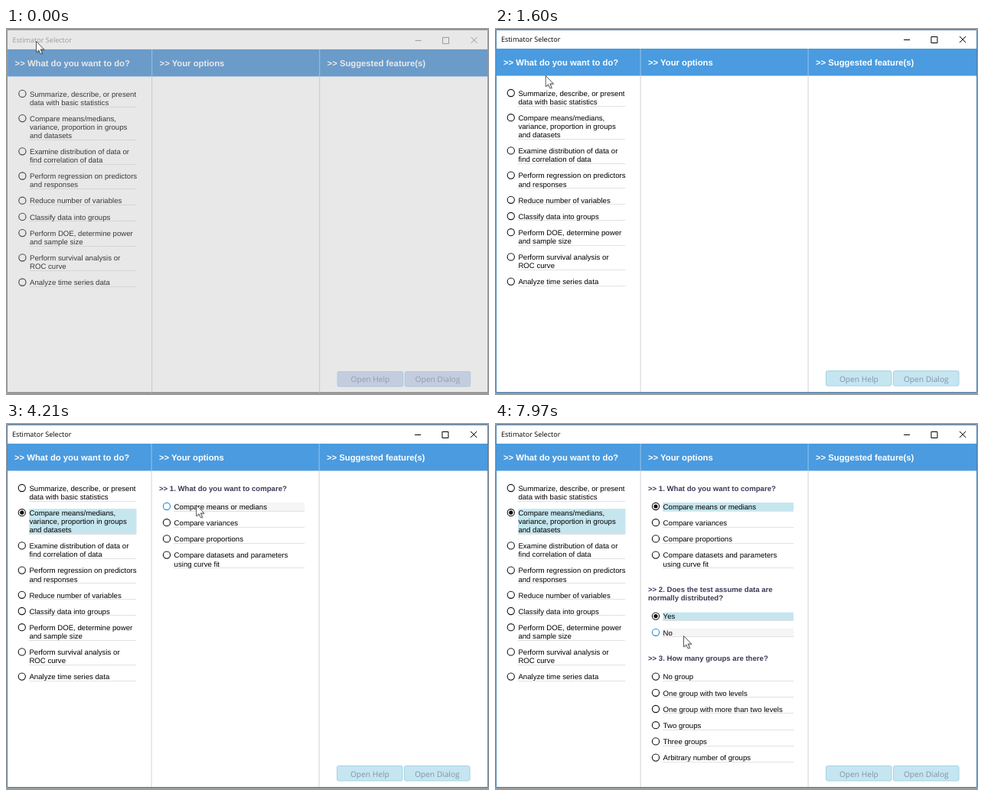
Write an HTML page that moves like this. It is 631x480 px and loops after 8 s.

```html
<!DOCTYPE html>
<html lang="en">
<head>
<meta charset="utf-8">
<title>Estimator Selector</title>
<style>
html, body { margin: 0; width: 100%; height: 100%; overflow: hidden; }
svg { display: block; width: 100%; height: 100%; }
text { font: 9.63px "Liberation Sans", Arial, sans-serif; white-space: pre; text-rendering: geometricPrecision; }
.head { font-size: 11.28px; font-weight: bold; fill: #fff; }
.ask { font-size: 9.6px; font-weight: bold; fill: #3b3b58; }
.title { font: 9.1px "Open Sans", "Noto Sans", sans-serif; }
.btn { font: 10.2px "Open Sans", "Noto Sans", sans-serif; fill: #8291a8; text-anchor: middle; }
</style>
</head>
<body>
<svg id="stage" viewBox="0 0 631 480"></svg>
<script>
const LOOP = 8000, STEP = 60, GAP = 11.2;
const stage = document.getElementById('stage');

function add(parent, tag, attrs, text) {
  const el = document.createElementNS('http://www.w3.org/2000/svg', tag);
  for (const k in attrs) el.setAttribute(k, attrs[k]);
  if (text) el.textContent = text;
  parent.appendChild(el);
  return el;
}
const box = (p, x, y, width, height, fill, more) => add(p, 'rect', { x, y, width, height, fill, ...more });
const line = (p, d, stroke, more) => add(p, 'path', { d, stroke, fill: 'none', ...more });
const show = (el, on) => el.setAttribute('visibility', on ? 'inherit' : 'hidden');

// Window frame
box(stage, 0, 0, 631, 480, '#9b9b9b');
box(stage, 1, 2, 629, 475, '#fff');
const edge = line(stage, 'M1.5 2.5H629.5V476.5H1.5Z', '#4a7fae');
const win = add(stage, 'g');

const titleBar = add(win, 'g');
add(titleBar, 'text', { class: 'title', x: 8, y: 18.4 }, 'Estimator Selector');
line(titleBar, 'M534 15.5H542M569.9 11.5H577.9V19.5H569.9ZM607 11L615 19M615 11L607 19', '#000');

// Column headers and dividers
const band = box(win, 1.5, 27, 627.5, 35.5, '#4a9bdf');
for (const x of [190.1, 409.1]) {
  line(win, `M${x} 27V62.5`, '#94c4ec');
  line(win, `M${x} 62.5V476`, '#d2d2d2');
}
[[11, 'What do you want to do?'], [200, 'Your options'], [419, 'Suggested feature(s)']]
  .forEach(([x, s]) => add(win, 'text', { class: 'head', x, y: 49 }, '>> ' + s));

// Buttons
const buttons = [[432.5, 'Open Help'], [520.5, 'Open Dialog']].map(([x, s]) => {
  const b = box(win, x, 448.5, 85.5, 19.5, '#c5e6f0', { rx: 2, stroke: '#a4d2e4' });
  add(win, 'text', { class: 'btn', x: x + 42.8, y: 462.6 }, s);
  return b;
});

// Radio options
const rows = [];
function addRow(parent, x, width, c, label, shownAt, pickedAt) {
  const lines = label.split('|');
  const bottom = Math.round(c + 5.5 + GAP * (lines.length - 1));
  const right = x + width;
  const back = box(parent, x, c - 5, width, bottom - c + 5, 'none');
  line(parent, `M${x} ${bottom + .5}H${right}`, '#c4c4c4', { 'stroke-dasharray': '1 1' });
  const ring = add(parent, 'circle', { cx: x - 9.4, cy: c, r: 4.6, fill: '#fff', 'stroke-width': 1.1 });
  const dot = add(parent, 'circle', { cx: x - 9.4, cy: c, r: 2.6 });
  lines.forEach((s, i) => add(parent, 'text', { x: x + .2, y: c + 3.7 + i * GAP }, s));
  rows.push({ left: x - 14, right, top: c - 6, bottom, back, ring, dot, shownAt, pickedAt });
  return c + 10.2 + 11 * lines.length;
}

let y = 85;
['Summarize, describe, or present|data with basic statistics',
 'Compare means/medians,|variance, proportion in groups|and datasets',
 'Examine distribution of data or|find correlation of data',
 'Perform regression on predictors|and responses',
 'Reduce number of variables',
 'Classify data into groups',
 'Perform DOE, determine power|and sample size',
 'Perform survival analysis or|ROC curve',
 'Analyze time series data'
].forEach((s, i) => { y = addRow(win, 30.2, 140.3, y, s, 0, i === 1 ? 3040 : Infinity); });

const questions = [
  { at: 3040, picked: 4940, ask: '1. What do you want to compare?',
    options: ['Compare means or medians', 'Compare variances', 'Compare proportions',
              'Compare datasets and parameters|using curve fit'] },
  { at: 4940, picked: 7220, ask: '2. Does the test assume data are|normally distributed?',
    options: ['Yes', 'No'] },
  { at: 7220, picked: Infinity, ask: '3. How many groups are there?',
    options: ['No group', 'One group with two levels', 'One group with more than two levels',
              'Two groups', 'Three groups', 'Arbitrary number of groups'] }
];
y = 85;
for (const q of questions) {
  q.group = add(win, 'g');
  const lines = ('>> ' + q.ask).split('|');
  lines.forEach((s, i) => add(q.group, 'text', { class: 'ask', x: 200, y: y + 3.7 + i * GAP }, s));
  y += 24 + GAP * (lines.length - 1);
  q.options.forEach((s, i) => { y = addRow(q.group, 219.4, 170.6, y, s, q.at, i ? Infinity : q.picked); });
  y += 12.6;
}

const veil = box(stage, 1, 2, 629, 475, '#b5b5b5', { opacity: .31 });

// Pointer
const pointer = add(stage, 'g');
const arrow = 'M0 0V14.4L3.3 11.4L5.6 16.4L7.8 15.4L5.6 10.5H10.2Z';
add(pointer, 'path', { d: arrow, fill: '#000', opacity: .22, transform: 'translate(1.6 1.4)' });
add(pointer, 'path', { d: arrow, fill: '#fff', stroke: '#444', 'stroke-width': .9 });

// Each move: start, end, then the three points of a quadratic curve
const moves = [
  [1000, 2440, [39.5, 17.5], [89, 82], [64, 121]],
  [3310, 4210, [64, 121], [160, 117], [248.7, 107.5]],
  [5340, 6420, [248.7, 107.5], [268, 150], [246, 252]],
  [7550, 7970, [246, 252], [245, 264], [246.5, 278.5]]
];

function pointerAt(t) {
  let move = moves[0];
  for (const m of moves) if (t >= m[0] + STEP) move = m;
  const [start, end, a, b, c] = move;
  const held = start + Math.floor((t - start) / STEP + 1e-6) * STEP;
  const u = Math.min(1, Math.max(0, (held - start) / (end - start)));
  const s = u * u * (3 - 2 * u), r = 1 - s;
  return a.map((v, i) => r * r * v + 2 * r * s * b[i] + s * s * c[i]);
}

function render(t) {
  const dim = t < 530, settled = t >= 1060;
  const [px, py] = pointerAt(t);
  pointer.setAttribute('transform', `translate(${px} ${py})`);
  win.setAttribute('transform', settled ? '' : 'translate(.6 .9)');
  edge.setAttribute('stroke', settled ? '#4a7fae' : '#858585');
  titleBar.setAttribute('opacity', dim ? .45 : 1);
  band.setAttribute('fill', dim ? '#4a8fd1' : '#4a9bdf');
  buttons.forEach(b => b.setAttribute('fill', dim ? '#cbd8f3' : '#c5e6f0'));
  show(veil, dim);
  questions.forEach(q => show(q.group, t >= q.at));

  for (const r of rows) {
    const picked = t >= r.pickedAt;
    const hover = t >= r.shownAt && px >= r.left && px <= r.right && py >= r.top && py <= r.bottom;
    const ink = hover ? '#2b8fd0' : '#111';
    r.back.setAttribute('fill', picked ? '#c5e6ef' : hover ? '#f5f5f5' : 'none');
    r.ring.setAttribute('stroke', ink);
    r.dot.setAttribute('fill', ink);
    show(r.dot, picked);
  }
}

const begin = performance.now();
function tick() {
  render((performance.now() - begin) % LOOP);
  requestAnimationFrame(tick);
}
render(0);
requestAnimationFrame(tick);
</script>
</body>
</html>
```
